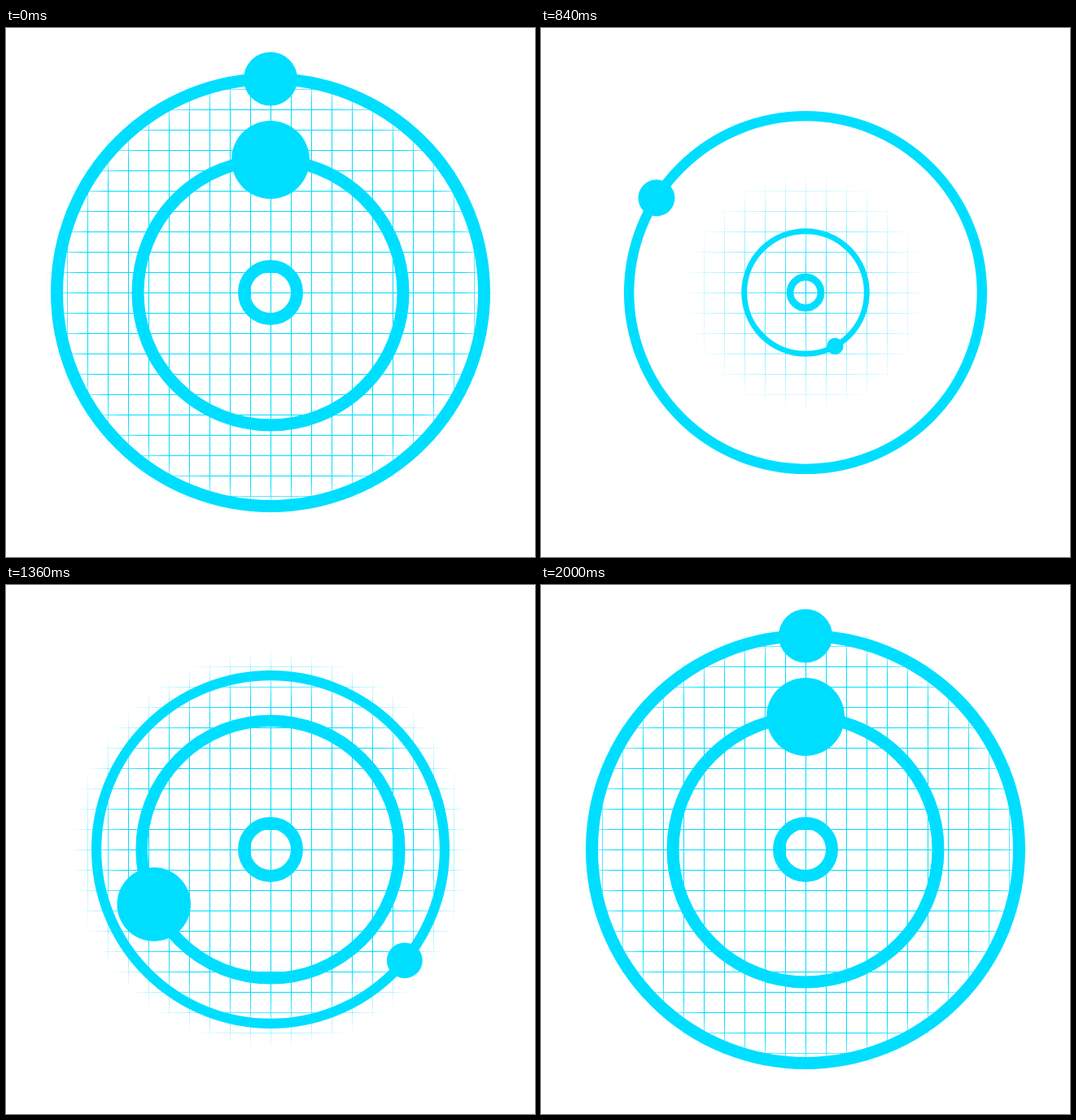
An HTML page with a canvas that plays this animation: 650 px wide and 650 px high, repeating every 2040 ms.

```html
<!DOCTYPE html>
<html lang="en">
<head>
<meta charset="utf-8">
<title>Orbits</title>
<style>
  html, body { margin: 0; width: 100%; height: 100%; overflow: hidden; background: #fff; }
  canvas { display: block; }
</style>
</head>
<body>
<canvas id="stage" width="650" height="650"></canvas>
<script>
const ctx = document.getElementById('stage').getContext('2d');
const TAU = Math.PI * 2, MID = 325, STEP = 40, LOOP = 2040, TURN = 2000;
const FAINT = 0.148, SOLID = 0.27; // grid brightness where lines vanish and fill
const rgba = a => `rgba(0, 222, 255, ${a})`;
const CYAN = rgba(1);

// low: time of the smallest size, depth: how far it shrinks, turns: dot laps per loop
const rings = [
  { radius: 262.5, dot: 33, turns: 2, low: 1101, depth: 0.705 },
  { radius: 163, dot: 48, turns: 1, low: 891, depth: 0.675 },
  { radius: 32.5, dot: 0, turns: 0, low: 725, depth: 0.7 }
];

// Cubic ease in to the low point, cubic ease out of it
function ringScale(ring, t) {
  const d = t - ring.low;
  const rest = Math.max(0, 1 - Math.abs(d) / (d < 0 ? 700 : 720));
  return 1 - ring.depth * rest ** 3;
}

// The grid fades towards its rim and dims in the middle of the loop
function drawGrid(t) {
  const d = Math.min(700, Math.abs(t - 1000));
  const glow = 1 - 0.413 * (1 + Math.cos(Math.PI * d / 700));
  const reach = level => Math.max(0, MID * (1 - level / glow));
  const fade = ctx.createRadialGradient(MID, MID, reach(SOLID), MID, MID, reach(FAINT));
  fade.addColorStop(0, rgba(Math.min(1, (glow - FAINT) / (SOLID - FAINT))));
  fade.addColorStop(1, rgba(0));
  ctx.fillStyle = fade;
  for (let p = 50; p <= 600; p += 25) {
    ctx.fillRect(p, 0, 1, 650);
    ctx.fillRect(0, p, 650, 1);
  }
}

function drawRing(ring, t) {
  const s = ringScale(ring, t), r = ring.radius * s;
  ctx.strokeStyle = ctx.fillStyle = CYAN;
  ctx.lineWidth = 15 * s;
  ctx.beginPath();
  ctx.arc(MID, MID, r, 0, TAU);
  ctx.stroke();
  if (ring.dot) {
    const a = TAU * ring.turns * t / TURN;
    ctx.beginPath();
    ctx.arc(MID + r * Math.sin(a), MID - r * Math.cos(a), ring.dot * s * s, 0, TAU);
    ctx.fill();
  }
}

const start = performance.now();
function frame() {
  const t = Math.floor(((performance.now() - start) % LOOP) / STEP) * STEP;
  ctx.fillStyle = '#fff';
  ctx.fillRect(0, 0, 650, 650);
  drawGrid(t);
  for (const ring of rings) drawRing(ring, t);
  requestAnimationFrame(frame);
}
frame();
</script>
</body>
</html>
```
